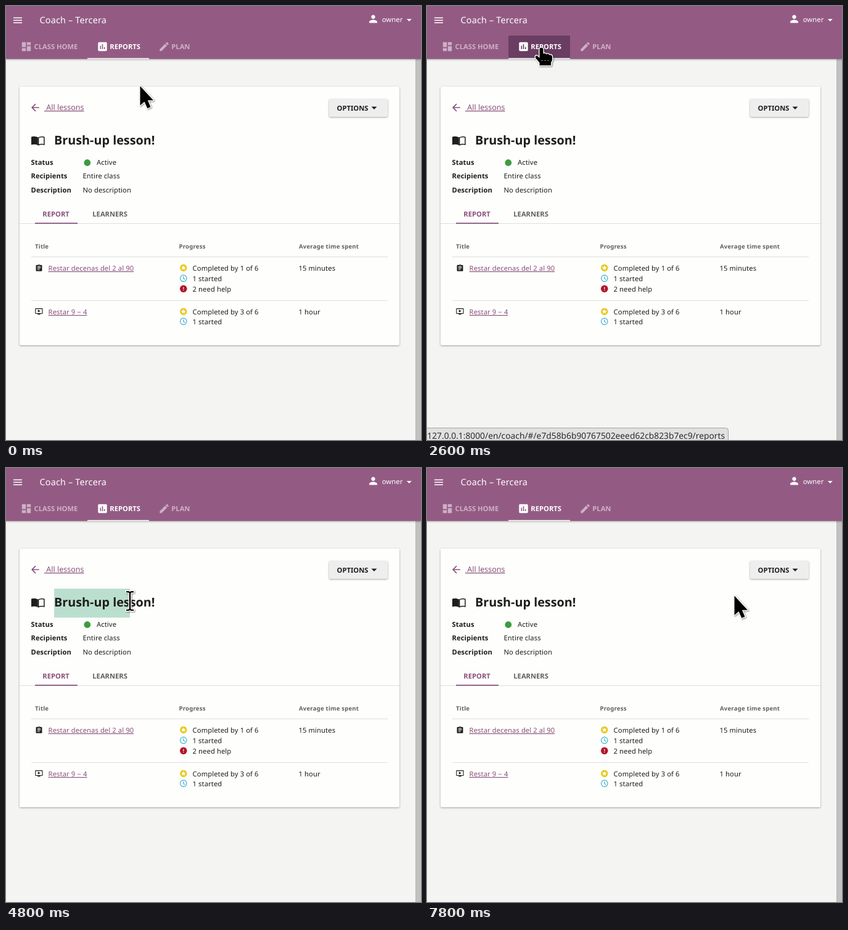
Recreate the animation shown at these times as an HTML page. Size 673 by 705 pixels, loop 8 s.

```html
<!DOCTYPE html>
<html lang="en">
<head>
<meta charset="utf-8">
<title>Coach reports</title>
<style>
  html, body { margin: 0; width: 100%; height: 100%; overflow: hidden; background: #f4f4f3; }
  svg { display: block; }
  text { font: 11.2px "Noto Sans", sans-serif; letter-spacing: .1px; fill: #1e1e1e; text-rendering: geometricPrecision; white-space: pre; }
  .bold { font-weight: 700; }
  .caps { font-weight: 700; letter-spacing: 0; }
  .head { font-size: 9.6px; font-weight: 700; letter-spacing: .2px; fill: #616161; }
  .link { fill: #895079; text-decoration: underline; }
  .white { fill: #fff; }
  .faded { fill: #cdb0c5; }
  .shadow { filter: drop-shadow(0 1px 1.5px rgba(0, 0, 0, .35)); }
  .pointer { fill: #000; stroke: #fff; stroke-width: 2.8; stroke-linejoin: round; paint-order: stroke; }
  #cursor { filter: drop-shadow(1px 1px 1px rgba(0, 0, 0, .45)); }
</style>
</head>
<body>
<svg width="673" height="705" viewBox="0 0 673 705">
  <defs>
    <path id="stars" d="M12 2a10 10 0 1 0 0 20 10 10 0 0 0 0-20zm4.23 16L12 15.45 7.77 18l1.12-4.81-3.73-3.23 4.92-.42L12 5l1.92 4.53 4.92.42-3.73 3.23L16.23 18z" fill="#ebc81f"/>
    <g id="clock" fill="none" stroke="#35add0" stroke-width="2">
      <circle cx="12" cy="12" r="9"/><path d="M12 6.5V12.5l4.5 2.7"/>
    </g>
    <g id="alert">
      <circle cx="12" cy="12" r="10" fill="#b3142b"/><path d="M11 7h2v6h-2zM11 15h2v2h-2z" fill="#fff"/>
    </g>
  </defs>

  <rect width="673" height="705" fill="#f4f4f3"/>
  <rect x="664" y="80" width="9" height="625" fill="#c1c1c1"/>
  <path d="M664.5 80V705" stroke="#b5b5b5"/>

  <g class="shadow">
    <rect width="673" height="86" fill="#935b84"/>
  </g>
  <path d="M12 19.3h14M12 23.3h14M12 27.3h14" stroke="#fff" stroke-width="1.6"/>
  <text class="white" x="54.5" y="28" style="font-size:14.4px;letter-spacing:.18px">Coach – Tercera</text>
  <path class="white" transform="translate(585.9 11.4) scale(.8)" d="M12 12c2.21 0 4-1.79 4-4s-1.79-4-4-4-4 1.79-4 4 1.79 4 4 4zm0 2c-2.67 0-8 1.34-8 4v2h16v-2c0-2.66-5.33-4-8-4z"/>
  <text class="white" x="609.7" y="26">owner</text>
  <path class="white" d="M649.8 21h8l-4 4z"/>

  <path id="hover" d="M132 86V50q0-2 2-2h96q2 0 2 2V86z" fill="#6a3d62"/>
  <rect class="white" x="132" y="84.6" width="100" height="1.6"/>
  <path class="faded" transform="translate(23.4 56.4) scale(.8)" d="M3 13h8V3H3v10zm0 8h8v-6H3v6zm10 0h8V11h-8v10zm0-18v6h8V3h-8z"/>
  <text class="caps faded" x="45.6" y="70">CLASS HOME</text>
  <path class="white" transform="translate(146.9 56.4) scale(.8)" d="M19 3H5c-1.1 0-2 .9-2 2v14c0 1.1.9 2 2 2h14c1.1 0 2-.9 2-2V5c0-1.1-.9-2-2-2zM9 17H7v-7h2v7zm4 0h-2V7h2v10zm4 0h-2v-4h2v4z"/>
  <text class="caps white" x="168.3" y="70">REPORTS</text>
  <path class="faded" transform="translate(246.9 56.4) scale(.8)" d="M3 17.25V21h3.75L17.81 9.94l-3.75-3.75L3 17.25zM20.71 7.04c.39-.39.39-1.02 0-1.41l-2.34-2.34c-.39-.39-1.02-.39-1.41 0l-1.83 1.83 3.75 3.75 1.83-1.83z"/>
  <text class="caps faded" x="268.3" y="70">PLAN</text>

  <rect class="shadow" x="22" y="131" width="616" height="420" rx="2" fill="#fefefd"/>
  <path transform="translate(37.8 155.4) scale(.8)" fill="#895079" d="M20 11H7.83l5.59-5.59L12 4l-8 8 8 8 1.41-1.41L7.83 13H20v-2z"/>
  <text class="link" x="62" y="169" style="font-size:12.5px;letter-spacing:0">&#160;All lessons</text>
  <rect class="shadow" x="524" y="151" width="95" height="29" rx="2" fill="#eee"/>
  <text class="caps" x="536.6" y="170">OPTIONS</text>
  <path d="M592.5 163.5h9l-4.5 4.5z" fill="#1e1e1e"/>

  <rect id="selection" x="78" y="196" height="47" fill="#bbdfcf"/>
  <g fill="#1e1e1e">
    <path d="M41 212.6q5.5-2.2 10.8.6V226.200q-5.300-2.400-10.800-.6z"/>
    <path d="M52.600 213.900q4.700-2.400 9.300-.8V225q-4.600-1.200-9.300.7z" fill="none" stroke="#1e1e1e" stroke-width="1.5"/>
  </g>
  <text class="bold" x="78" y="225" style="font-size:19.8px;letter-spacing:0">Brush-up lesson!</text>

  <text class="bold" x="40.500" y="258">Status</text>
  <circle cx="131.800" cy="254.500" r="5.400" fill="#3f9b3f"/>
  <text x="147" y="258">Active</text>
  <text class="bold" x="40.500" y="280">Recipients</text>
  <text x="124.500" y="280">Entire class</text>
  <text class="bold" x="40.500" y="303">Description</text>
  <text x="124.500" y="303">No description</text>

  <text class="caps" x="59.300" y="342" style="fill:#895079">REPORT</text>
  <text class="caps" x="140.300" y="342" style="fill:#616161">LEARNERS</text>
  <path d="M22 353.500H638M41 407.500H619M41 478.500H619" stroke="#dedede"/>
  <rect x="47" y="352" width="69" height="1.700" fill="#895079"/>

  <text class="head" x="47" y="394">Title</text>
  <text class="head" x="280.500" y="394">Progress</text>
  <text class="head" x="475" y="394">Average time spent</text>

  <path transform="translate(46.900 419.200) scale(.55)" fill="#1e1e1e" d="M19 3h-4.180C14.400 1.840 13.300 1 12 1c-1.300 0-2.400.840-2.820 2H5c-1.100 0-2 .900-2 2v14c0 1.100.900 2 2 2h14c1.100 0 2-.900 2-2V5c0-1.100-.900-2-2-2zm-7 0a1 1 0 1 1 0 2 1 1 0 0 1 0-2zm2 14H7v-2h7v2zm3-4H7v-2h10v2zm0-4H7V7h10v2z"/>
  <text class="link" x="68.600" y="430">Restar decenas del 2 al 90</text>
  <path transform="translate(46.700 489.400) scale(.56)" fill="#1e1e1e" d="M21 3H3c-1.100 0-2 .900-2 2v12c0 1.100.900 2 2 2h5v2h8v-2h5c1.100 0 2-.900 2-2V5c0-1.100-.900-2-2-2zm0 14H3V5h18v12zm-5-6l-7 4V7z"/>
  <text class="link" x="68.600" y="501">Restar 9 − 4</text>
  <g id="progress"></g>
  <text x="474.500" y="430">15 minutes</text>
  <text x="474.500" y="501">1 hour</text>

  <g id="status">
    <path d="M-1 706V685.500H484.500q4 0 4 4V706z" fill="#e1e1e1" stroke="#a3a3a3"/>
    <text x=".3" y="702.700" style="font-size:13.800px;letter-spacing:0;fill:#2b2b2b">127.0.0.1:8000/en/coach/#/e7d58b6b90767502eeed62cb823b7ec9/reports</text>
  </g>

  <g id="cursor">
    <path id="arrow" class="pointer" d="M0 0V31.500L7 25.500 11.800 36.300 17 34 12.400 23.300H21.500z"/>
    <g id="hand">
      <path class="pointer" d="M0 2.500Q3-1.500 6 2.500V10.500Q9 8.500 11 11.500 14 9.800 16 12.600 20.500 11.500 20.500 16V21L18.500 25V29.500H0V25L-6.500 17.500Q-7.500 12.500-3.500 14L0 17.500z"/>
      <path d="M4 21v2M9 21v2M14 21v2" stroke="#fff" stroke-width="1.200" stroke-dasharray="1"/>
    </g>
    <path id="beam" class="pointer" d="M-6-16H-2L0-15 2-16H6V-13.800H2.500L1.200-12.500V12.500L2.500 13.800H6V16H2L0 15-2 16H-6V13.800H-2.500L-1.200 12.500V-12.500L-2.500-13.800H-6z"/>
  </g>
</svg>
<script>
  const LOOP = 8000;
  const byId = id => document.getElementById(id);
  const show = (id, on) => byId(id).style.display = on ? '' : 'none';

  const progress = [
    ['stars', 430, 'Completed by 1 of 6'],
    ['clock', 447, '1 started'],
    ['alert', 464, '2 need help'],
    ['stars', 501, 'Completed by 3 of 6'],
    ['clock', 517, '1 started']
  ];
  byId('progress').innerHTML = progress.map(([icon, y, label]) =>
    `<use href="#${icon}" transform="translate(280.8 ${y - 11.6}) scale(.58)"/>
     <text x="302.6" y="${y}">${label}</text>`).join('');

  // time, pointer, x, y, tab hover, status bar, selection end
  const steps = [
    [0, 'arrow', 217.5, 130],
    [200, 'arrow', 218.8, 131],
    [800, 'arrow', 200, 98],
    [1000, 'hand', 183, 74, 1],
    [1200, 'hand', 183, 68, 1, 1],
    [1400, 'hand', 183, 67, 1, 1],
    [2600, 'hand', 182.5, 67, 1, 1],
    [2800, 'hand', 173, 78, 1, 1],
    [3000, 'arrow', 135, 135, 0, 1],
    [3200, 'beam', 101, 203],
    [3400, 'beam', 94.5, 215.5],
    [3600, 'beam', 90.5, 219],
    [3800, 'beam', 82.5, 220],
    [4200, 'beam', 92, 219, 0, 0, 92],
    [4400, 'beam', 122, 217, 0, 0, 122],
    [4600, 'beam', 165, 216, 0, 0, 165],
    [4800, 'beam', 201, 216, 0, 0, 201],
    [5000, 'beam', 236, 215, 0, 0, 236],
    [5200, 'arrow', 253.8, 213.5, 0, 0, 243],
    [6200, 'arrow', 251.3, 213, 0, 0, 243],
    [6600, 'arrow', 251.3, 214],
    [6800, 'arrow', 251.3, 215],
    [7200, 'arrow', 285, 216.5],
    [7400, 'arrow', 380, 214],
    [7600, 'arrow', 470, 209],
    [7800, 'arrow', 498.5, 207.5]
  ];

  let current;
  function render() {
    const time = performance.now() % LOOP;
    const step = steps.findLast(s => s[0] <= time);
    if (step !== current) {
      current = step;
      const [, pointer, x, y, hover, status, end = 78] = step;
      for (const id of ['arrow', 'hand', 'beam']) show(id, id === pointer);
      byId('cursor').setAttribute('transform', `translate(${x} ${y})`);
      show('hover', hover);
      show('status', status);
      byId('selection').setAttribute('width', end - 78);
    }
    requestAnimationFrame(render);
  }
  render();
</script>
</body>
</html>
```
